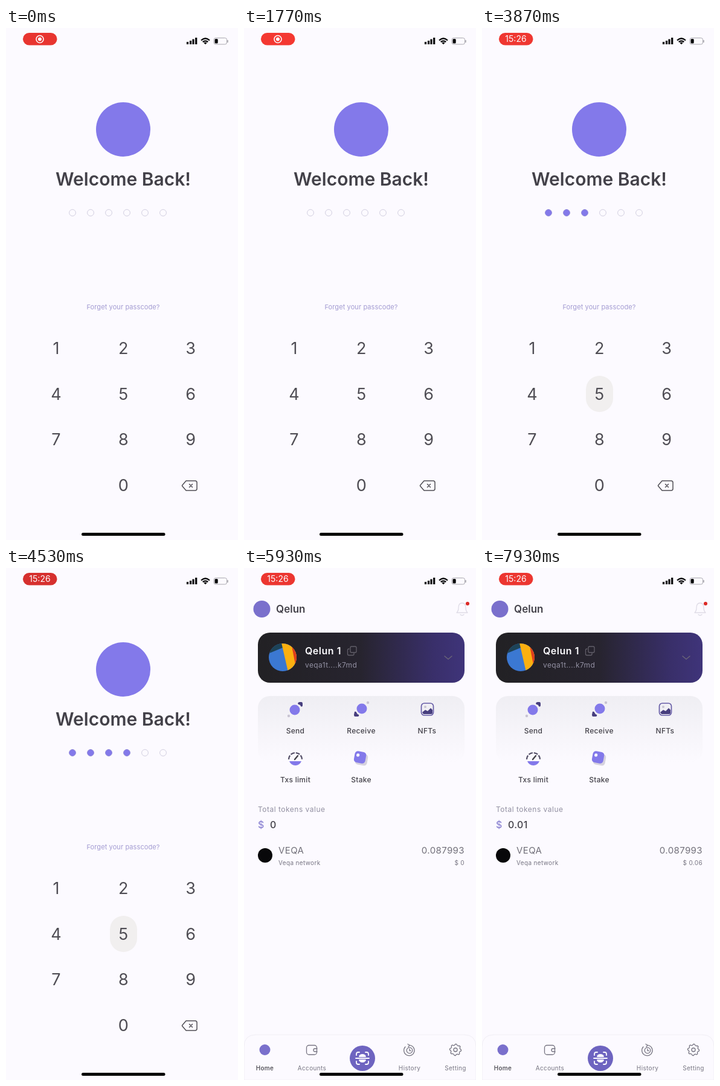
An HTML page for the animation above (8 s loop, 384 px wide and 848 px high).

```html
<!DOCTYPE html>
<html lang="en">
<head>
<meta charset="utf-8">
<title>Passcode to wallet home</title>
<style>
  html, body { margin: 0; width: 100%; height: 100%; overflow: hidden; background: #fcfaff; }
  svg { display: block; width: 100vw; height: 100vh; font-family: Inter, Roboto, sans-serif; }
  text { fill: #434149; }
  .page { fill: #fcfaff; }
  .mid { text-anchor: middle; }
  .end { text-anchor: end; }
  .key { font-size: 27px; fill: #4f4d54; }
  .label { font-size: 12px; font-weight: 500; letter-spacing: .3px; }
  .small { font-size: 10px; letter-spacing: .35px; fill: #777582; }
  .soft { fill: #9290a2; }
  .amount { font-size: 15px; letter-spacing: .4px; fill: #72707a; }
  .value { font-size: 16px; font-weight: 500; letter-spacing: .4px; }
  .line { fill: none; stroke: #777582; stroke-width: 1.3; stroke-linecap: round; stroke-linejoin: round; }
  .violet { fill: #8379ea; }
  .dark { fill: #473e7e; }
</style>
</head>
<body>
<svg viewBox="0 0 384 848" preserveAspectRatio="none">
  <defs>
    <linearGradient id="cardFill">
      <stop offset="0" stop-color="#222124"/><stop offset=".5" stop-color="#27242f"/>
      <stop offset=".85" stop-color="#392f6a"/><stop offset="1" stop-color="#3f347a"/>
    </linearGradient>
    <linearGradient id="panelFill" x2="0" y2="1">
      <stop offset="0" stop-color="#efeef3"/><stop offset="1" stop-color="#fcfaff"/>
    </linearGradient>
    <clipPath id="avatarClip"><circle cx="64" cy="148" r="23"/></clipPath>
  </defs>

  <g id="lock">
    <rect width="384" height="848" class="page"/>
    <circle cx="194" cy="168" r="45" class="violet"/>
    <text class="mid" x="194" y="261" font-size="30" font-weight="600">Welcome Back!</text>
    <g id="dots"></g>
    <text class="mid" x="194" y="466" font-size="11" letter-spacing=".1" style="fill:#a39bd2">Forget your passcode?</text>
    <rect id="press" x="172" y="576" width="45" height="60" rx="22.5" fill="#f1efef"/>
    <g id="keys"></g>
    <g class="line" style="stroke:#4f4d54;stroke-width:1.5">
      <path d="M298 750H313Q316 750 316 753V763Q316 766 313 766H298L292 759Q291 758 292 757Z"/>
      <path d="M303.5 755.5L308.5 760.5M308.5 755.5L303.5 760.5"/>
    </g>
  </g>

  <g id="home">
    <rect width="384" height="848" class="page"/>
    <circle cx="29.5" cy="68" r="14" fill="#7a70cc"/>
    <text x="53" y="74" font-size="17" font-weight="600">Qelun</text>
    <path class="line" style="stroke:#dedbe6" d="M352 74Q355 71 355 66Q355 58 361 58Q367 58 367 66Q367 71 370 74ZM358 77Q361 80 364 77"/>
    <circle cx="370" cy="59" r="3" fill="#dc2a26"/>

    <rect x="23" y="107" width="342" height="83" rx="20" fill="url(#cardFill)"/>
    <g clip-path="url(#avatarClip)">
      <rect x="40" y="124" width="48" height="48" fill="#3b78d2"/>
      <path d="M40 124H64V132L40 142Z" fill="#1d4358"/>
      <path d="M62 124H90V172H73Z" fill="#fbb010"/>
      <path d="M78 124H90V165H86Z" fill="#de3e1c"/>
    </g>
    <text x="101" y="143" font-size="16" font-weight="600" letter-spacing=".5" style="fill:#fdfcff">Qelun 1</text>
    <g class="line" style="stroke:#625f69">
      <rect x="176" y="130" width="10" height="10" rx="2"/>
      <path d="M174 134H173.5Q171.5 134 171.5 136V142.5Q171.5 144.5 173.5 144.5H180Q182 144.5 182 142.5V141"/>
    </g>
    <text class="soft" x="101" y="165" font-size="12" letter-spacing=".4">veqa1t....k7md</text>
    <path class="line" style="stroke:#6c6878" d="M332 146L338 151L344 146"/>

    <rect x="23" y="212" width="342" height="110" rx="20" fill="url(#panelFill)"/>
    <g>
      <circle cx="84" cy="235" r="8.5" class="violet"/>
      <path class="dark" d="M89 224Q90 222 92 222H95Q97 222 97 225V228Q96 231 94 229Q93 226 90 226Z"/>
      <circle cx="74" cy="245" r="2.2" fill="#c8c4d2"/>
    </g>
    <g>
      <circle cx="195" cy="233" r="8.5" class="violet"/>
      <path class="dark" d="M183 238Q185 237 186 239Q187 242 190 243Q191 246 188 246H184Q182 246 182 243Z"/>
      <circle cx="205" cy="223" r="2.2" fill="#c8c4d2"/>
    </g>
    <g>
      <rect x="293.5" y="224" width="20" height="20" rx="5" fill="#f0eff4" stroke="#665ca6" stroke-width="1.7"/>
      <path class="dark" d="M295 239L300 235L304 237L309 232L312 235V240Q312 242 310 242H297Z"/>
      <circle cx="300" cy="230" r="2" fill="#c8c4d2"/>
    </g>
    <g>
      <path d="M74 317A11 11 0 0 1 96 317" fill="none" stroke="#57526a" stroke-width="2.3" stroke-dasharray="7 2"/>
      <path class="violet" d="M75 320H95Q92 327 85 327Q78 327 75 320Z"/>
      <path d="M84 317L89 311" stroke="#434149" stroke-width="2.4" stroke-linecap="round"/>
    </g>
    <g transform="rotate(10 192 314)">
      <rect x="185" y="307" width="20" height="19" rx="5" fill="#d6d2de"/>
      <rect x="182.5" y="304" width="19" height="19" rx="5" class="violet"/>
      <circle cx="188" cy="310.5" r="2.6" class="page"/>
    </g>
    <g class="label mid">
      <text x="85" y="274">Send</text><text x="194" y="274">Receive</text><text x="303" y="274">NFTs</text>
      <text x="85" y="355">Txs limit</text><text x="194" y="355">Stake</text>
    </g>

    <text class="soft" x="23" y="404" font-size="12" letter-spacing=".5">Total tokens value</text>
    <text class="value" x="23" y="431" style="fill:#8b83d2">$</text>
    <text class="value" id="total" x="43" y="431">0</text>

    <g id="empty">
      <ellipse cx="194" cy="520" rx="79" ry="16" transform="rotate(-6 194 520)" fill="none" stroke="#a5a3ae" stroke-dasharray="5 3"/>
      <rect x="190" y="459" width="28" height="28" rx="5" fill="#e3cbd0" transform="rotate(-15 204 473)"/>
      <circle cx="179" cy="483" r="25" fill="#f0eee0"/>
      <rect x="146" y="476" width="94" height="68" rx="7" fill="#d0cdd2" transform="rotate(-15 193 510)"/>
      <circle cx="188" cy="508" r="13" fill="#a9a4bc"/>
      <circle cx="220" cy="500" r="7" fill="#f0eee8"/>
      <circle cx="133" cy="532" r="9" fill="#aaa8b0"/>
      <text class="mid" x="194" y="592" font-size="16" font-weight="600" letter-spacing=".3" style="fill:#8c8a94">No token found</text>
      <text class="mid soft" x="194" y="623" font-size="12" letter-spacing=".2">All tokens of this smart account will show here</text>
    </g>

    <g id="token">
      <circle cx="35" cy="476" r="12" fill="#08080a"/>
      <text class="amount" x="57" y="473">VEQA</text>
      <text class="small" x="57" y="492">Veqa network</text>
      <text class="amount end" x="365" y="473">0.087993</text>
      <text class="small end" id="price" x="365" y="492">$ 0</text>
    </g>

    <path class="page" d="M0 848V793Q0 773 20 773H364Q384 773 384 793V848Z" stroke="#f0eef4"/>
    <circle cx="34.5" cy="798" r="9" fill="#7a70cc"/>
    <g class="line">
      <rect x="103.5" y="790.5" width="17" height="15.5" rx="4"/>
      <path d="M121 796H117.5Q115 796 115 798.5T117.5 801H121"/>
      <path d="M267 793A8.7 8.7 0 1 0 274 790.3L271 788.5M274 790.3L272 793"/>
      <circle cx="274" cy="799" r="4.8"/><path d="M274 796.5V799.5H276"/>
      <circle cx="350" cy="798" r="3"/><path id="gear"/>
    </g>
    <circle cx="196" cy="812" r="21" fill="#6e64c0"/>
    <g class="line" style="stroke:#fdfcff;stroke-width:1.8">
      <path d="M186 807V805Q186 802 189 802H191M201 802H203Q206 802 206 805V807M206 817V819Q206 822 203 822H201M191 822H189Q186 822 186 819V817M185 812H207"/>
      <path fill="#fdfcff" d="M191 809Q192 806 196 806T201 809ZM191 815Q192 818 196 818T201 815Z"/>
    </g>
    <g class="mid">
      <text class="small" x="34.5" y="832" style="fill:#434149;font-weight:500">Home</text>
      <text class="small" x="112.5" y="832">Accounts</text>
      <text class="small" x="274" y="832">History</text>
      <text class="small" x="350" y="832">Setting</text>
    </g>
  </g>

  <g id="status">
    <rect id="pill" x="28" y="8" width="56.5" height="20.5" rx="10.25"/>
    <g id="record">
      <circle cx="56" cy="18.5" r="6" fill="none" stroke="#fdfcff" stroke-width="1.6"/>
      <circle cx="56" cy="18.5" r="3" fill="#fdfcff"/>
    </g>
    <text id="clock" class="mid" x="56" y="23.3" font-size="14" style="fill:#fdfcff">15:26</text>
    <path d="M300.5 27V23M305.5 27V21M310 27V18.5M314.7 27V16" stroke="#08080a" stroke-width="3.2"/>
    <g fill="none" stroke="#08080a" stroke-width="2.3">
      <path d="M323 20.5Q330 14 337 20.5M325.7 23.2Q330 19.5 334.3 23.2"/>
      <path d="M327.3 24.5Q330 22.5 332.7 24.5L330 27.2Z" fill="#08080a" stroke="none"/>
    </g>
    <rect x="344" y="16.5" width="21.5" height="10.5" rx="3" fill="none" stroke="#a9a7ae"/>
    <path d="M367 20V24" stroke="#a9a7ae" stroke-width="1.5"/>
    <rect x="345.5" y="18" width="5.2" height="7.5" rx="1.5" fill="#08080a"/>
    <rect x="125" y="836" width="138.5" height="5" rx="2.5" fill="#000"/>
  </g>
</svg>

<script>
const LOOP = 8000;
const TAPS = [2750, 3300, 3850, 4400, 4750, 5080];
const PRESS_TIME = 200;
const CLOCK_AT = 2250;
const SLIDE = { start: 5298, length: 500 };
const TOKEN_AT = 5800, PRICE_AT = 7730, COUNT_AT = 7870;

const el = id => document.getElementById(id);
const show = (id, on) => el(id).setAttribute('visibility', on ? 'visible' : 'hidden');

el('dots').innerHTML = TAPS.map((_, i) =>
  `<circle cx="${110 + 30 * i}" cy="306" r="5.4"/>`).join('');
const dots = [...el('dots').children];

el('keys').innerHTML = [...'123456789 0'].map((digit, i) =>
  `<text class="key mid" x="${83 + 111.3 * (i % 3)}" y="${540 + 75.7 * Math.floor(i / 3)}">${digit}</text>`).join('');

// Eight-toothed cog outline
el('gear').setAttribute('d', 'M' + Array.from({ length: 32 }, (_, i) => {
  const angle = i * Math.PI / 16, radius = i % 4 < 2 ? 9.5 : 7.8;
  return `${350 + radius * Math.cos(angle)} ${798 + radius * Math.sin(angle)}`;
}).join('L') + 'Z');

function draw(t) {
  const glow = .5 + .5 * Math.cos((t - 5500) * Math.PI / 1000);
  el('pill').setAttribute('fill', `rgb(${214 + 36 * glow}, ${48 + 10 * glow}, ${46 + 4 * glow})`);
  show('record', t < CLOCK_AT);
  show('clock', t >= CLOCK_AT);

  dots.forEach((dot, i) => {
    const filled = t >= TAPS[i];
    dot.setAttribute('fill', filled ? '#8379ea' : 'none');
    dot.setAttribute('stroke', filled ? '#8f87d8' : '#d2cfe0');
  });
  show('press', TAPS.some(tap => t >= tap && t < tap + PRESS_TIME));

  const progress = Math.min(1, Math.max(0, (t - SLIDE.start) / SLIDE.length));
  el('home').setAttribute('transform', `translate(${384 * (1 - progress) ** 2} 0)`);
  show('home', progress > 0);
  const loaded = t >= TOKEN_AT;
  el('empty').style.display = loaded ? 'none' : '';
  el('token').style.display = loaded ? '' : 'none';
  el('price').textContent = t >= PRICE_AT ? '$ 0.06' : '$ 0';
  el('total').textContent = t >= COUNT_AT ? '0.01' : '0';
}

const begin = performance.now();
function frame() {
  draw((performance.now() - begin) % LOOP);
  requestAnimationFrame(frame);
}
draw(0);
requestAnimationFrame(frame);
</script>
</body>
</html>
```
